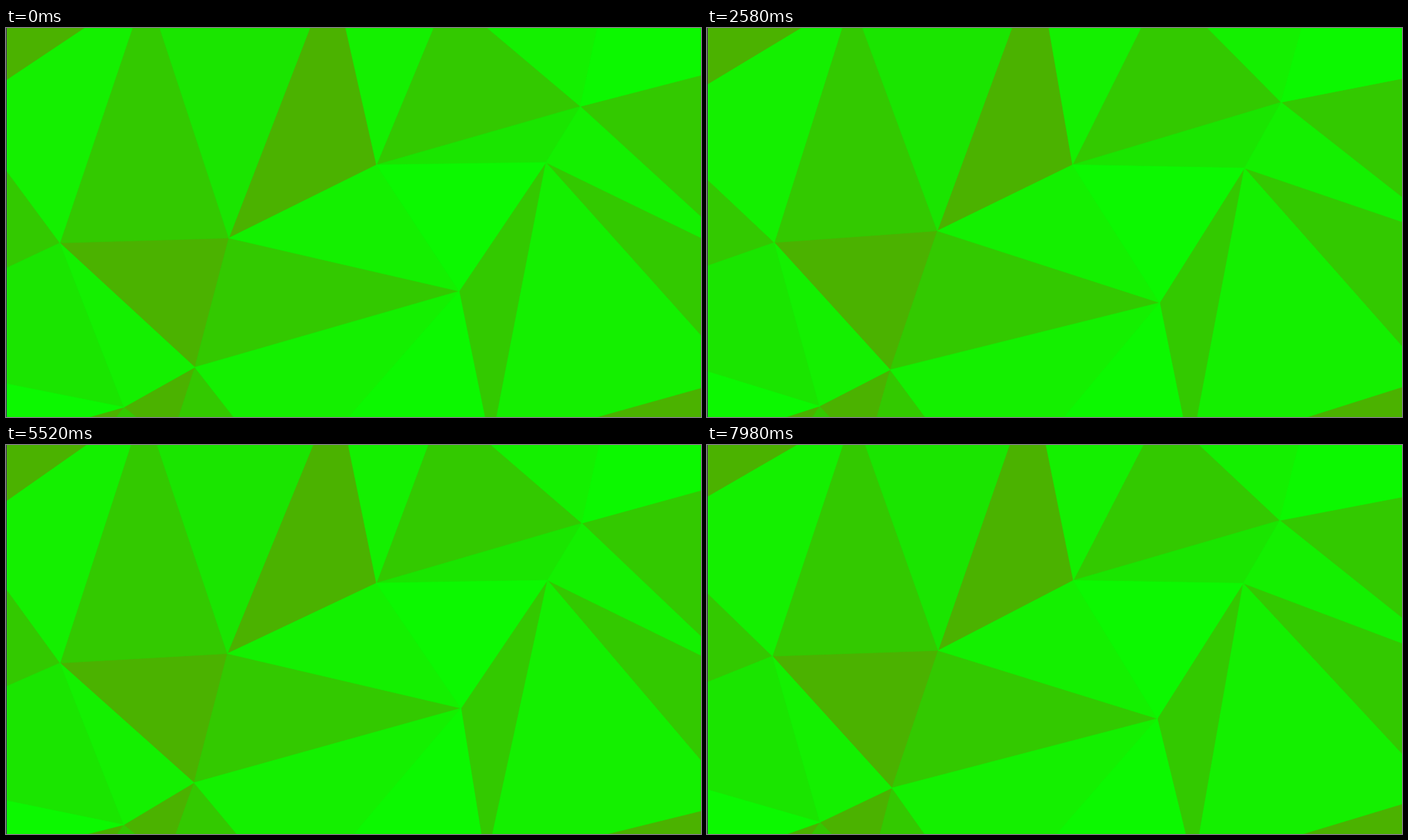
An HTML page with a canvas for the animation above (8 s loop, 960 by 538 pixels).

```html
<!DOCTYPE html>
<html lang="en">
<head>
<meta charset="utf-8">
<title>Drifting triangles</title>
<style>
  html, body { margin: 0; width: 100%; height: 100%; overflow: hidden; background: #402060; }
  canvas { display: block; }
</style>
</head>
<body>
<canvas id="stage" width="960" height="538"></canvas>
<script>
const ctx = document.getElementById('stage').getContext('2d');
const LOOP = 8000, STEP = 60;

// Each corner circles its home: x, y, radius, start angle (deg), speed (deg/s).
const corners = {
  a: [83.8, 298.9, 9.5, 190, 60.6],
  b: [312, 284.5, 7.3, 125, -61.1],
  c: [508.3, 190, 3.5, -12, -60],
  d: [794, 105.5, 3, 102, 57.8],
  e: [745, 190.3, 4.4, -80, -59.3],
  f: [627, 372, 8.1, -98, -61.9],
  g: [256.5, 470, 4.4, -10, 59.3],
  h: [159, 524.3, 3.8, 2, -62.8],
  top1: [195, -48.5, 8.3, -99, 60.5],
  top2: [455.5, -87, 7.7, 126, 57.1],
  top3: [617.5, -57.5, 13.4, 126, -56],
  top4: [850, -120, 7, 187, 55],
  right1: [1040, 47.5, 9, -33, 60],
  right2: [1027, 307, 15.8, 89.5, -57.1],
  right3: [1005.5, 487.3, 7.4, -33, -47.6],
  left1: [-71, 124, 14.3, -46.5, -60.6],
  left2: [-233, 424, 21, 103, -61.4],
  low0: [-60, 588, 12.5, -15, 60],
  low1: [115, 590, 7, 135, 60],
  low2: [221, 583, 9.5, -55, 60],
  low3: [394, 647, 13.5, -110.6, -57.6],
  low4: [666.5, 583.7, 5.6, -55, 51.9],
  outerTop: [-70, -60, 0, 0, 0],
  outerLow: [960, 720, 0, 0, 0]
};

const faces = {
  '#4bb200': ['left1 top1 outerTop', 'b c top2', 'a b g', 'g h low2', 'h low0 low1',
    'right3 low4 outerLow'],
  '#33c900': ['a b top1', 'c d top3', 'd right1 right2', 'a left1 left2', 'b f g',
    'e f low4', 'e right2 right3', 'g low2 low3', 'h low1 low2'],
  '#1ae500': ['b top1 top2', 'c d e', 'a h left2'],
  '#14f000': ['a left1 top1', 'c top2 top3', 'd top3 top4', 'd e right2', 'b c f',
    'a g h', 'e right3 low4', 'f g low3'],
  '#0cf800': ['d top4 right1', 'c e f', 'f low3 low4', 'h left2 low0']
};

function place([x, y, radius, start, speed], seconds) {
  const angle = (start + speed * seconds) * Math.PI / 180;
  return [x + radius * Math.cos(angle), y + radius * Math.sin(angle)];
}

function draw(now) {
  const seconds = Math.floor(now % LOOP / STEP) * STEP / 1000;
  const points = {};
  for (const name in corners) points[name] = place(corners[name], seconds);

  ctx.lineWidth = 0.6; // closes the hairline seams between faces
  ctx.lineJoin = 'round';
  for (const color in faces) {
    ctx.fillStyle = ctx.strokeStyle = color;
    for (const face of faces[color]) {
      ctx.beginPath();
      for (const name of face.split(' ')) ctx.lineTo(...points[name]);
      ctx.closePath();
      ctx.fill();
      ctx.stroke();
    }
  }
  ctx.fillStyle = '#402060';
  ctx.fillRect(0, 0, 1, 538);
}

const begin = performance.now();
function tick() {
  draw(performance.now() - begin);
  requestAnimationFrame(tick);
}
tick();
</script>
</body>
</html>
```
